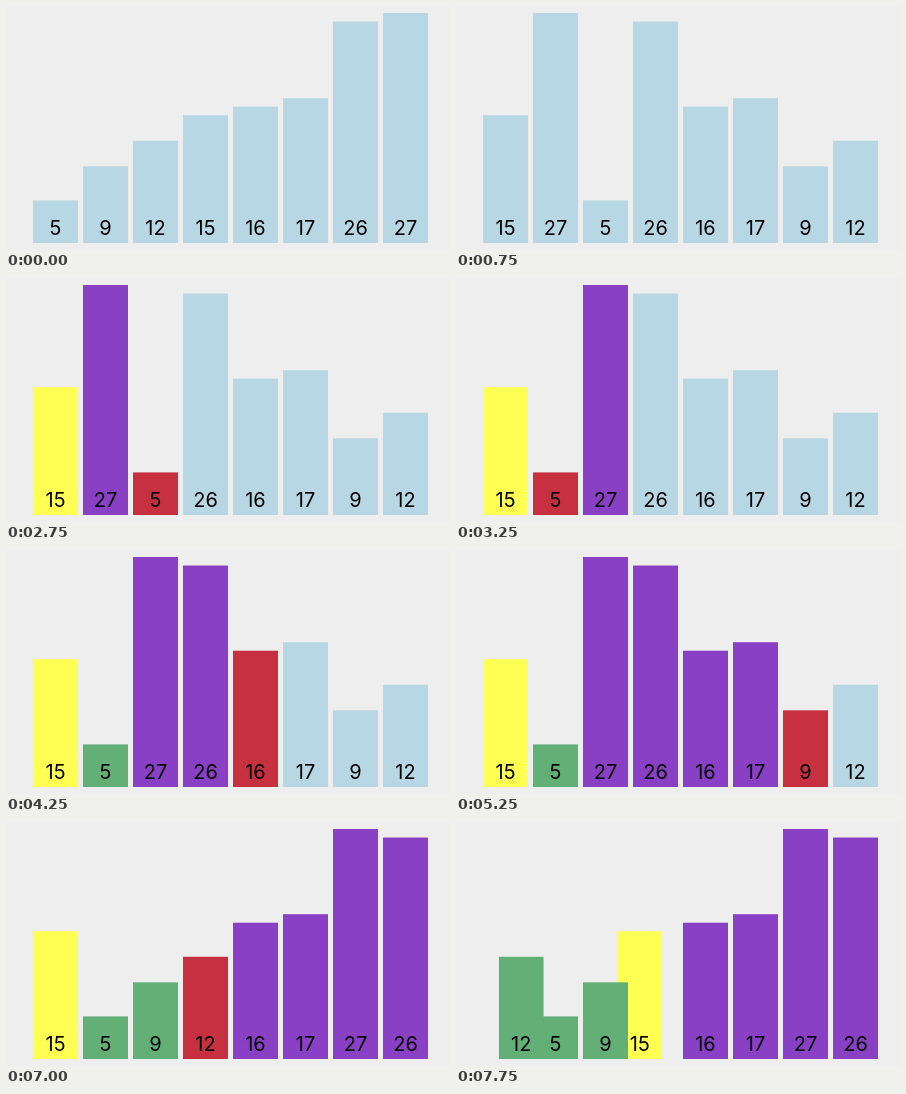
Write an HTML page that moves like this. It is 444x244 px and loops after 8 s.

```html
<!DOCTYPE html>
<html lang="en">
<head>
<meta charset="utf-8">
<title>Quicksort partition</title>
<style>
  html, body { margin: 0; width: 100%; height: 100%; overflow: hidden; background: #eee; }
  svg { display: block; width: 444px; height: 244px; }
  text { font: 20px Inter, "Liberation Sans", sans-serif; text-anchor: middle; fill: #000; }
</style>
</head>
<body>
<svg id="stage" viewBox="0 0 444 244"></svg>
<script>
const LOOP = 8000, SHUFFLE_AT = 350, MOVE = 200;
const stepTime = n => 1536 + 503 * n;

const LEFT = 27, PITCH = 50, WIDTH = 45, BOTTOM = 237, UNIT = 230 / 27;
const COLORS = { idle: '#b6d7e3', pivot: '#ffff54', active: '#c7303f', less: '#63b077', more: '#8a40c4' };

const values = [15, 27, 5, 26, 16, 17, 9, 12];
const sorted = [...values].sort((a, b) => a - b);

// value: [step, state] pairs
const states = {
  15: [[0, 'pivot']],
  27: [[1, 'active'], [2, 'more']],
  5: [[2, 'active'], [4, 'less']],
  26: [[4, 'active'], [5, 'more']],
  16: [[5, 'active'], [6, 'more']],
  17: [[6, 'active'], [7, 'more']],
  9: [[7, 'active'], [9, 'less']],
  12: [[9, 'active'], [11, 'less']]
};

// step, then the two values that trade places
const swaps = [[3, 27, 5], [8, 27, 9], [10, 26, 12], [12, 15, 12]];

const moves = Object.fromEntries(values.map((v, i) => [v, [[SHUFFLE_AT, i]]]));
const order = [...values];
for (const [step, a, b] of swaps) {
  const i = order.indexOf(a), j = order.indexOf(b);
  [order[i], order[j]] = [b, a];
  moves[a].push([stepTime(step), j]);
  moves[b].push([stepTime(step), i]);
}

function add(parent, tag, attrs) {
  const el = document.createElementNS('http://www.w3.org/2000/svg', tag);
  for (const key in attrs) el.setAttribute(key, attrs[key]);
  return parent.appendChild(el);
}

function slideFrames(value) {
  const at = (time, slot) => ({ offset: time / LOOP, transform: `translateX(${LEFT + PITCH * slot}px)` });
  let slot = sorted.indexOf(value);
  const frames = [at(0, slot)];
  for (const [time, next] of moves[value]) {
    frames.push(at(time, slot), at(time + MOVE, next));
    slot = next;
  }
  return [...frames, at(LOOP, slot)];
}

function colorFrames(value) {
  const at = (time, state) => ({ offset: time / LOOP, fill: COLORS[state], easing: 'steps(1, end)' });
  const changes = states[value];
  return [
    at(0, 'idle'),
    ...changes.map(([step, state]) => at(stepTime(step), state)),
    at(LOOP, changes.at(-1)[1])
  ];
}

const stage = document.getElementById('stage');
const timing = { duration: LOOP, iterations: Infinity };
for (const value of values) {
  const height = value * UNIT;
  const bar = add(stage, 'g', {});
  const rect = add(bar, 'rect', { y: BOTTOM - height, width: WIDTH, height });
  add(bar, 'text', { x: WIDTH / 2, y: 229 }).textContent = value;
  bar.animate(slideFrames(value), timing);
  rect.animate(colorFrames(value), timing);
}
</script>
</body>
</html>
```
